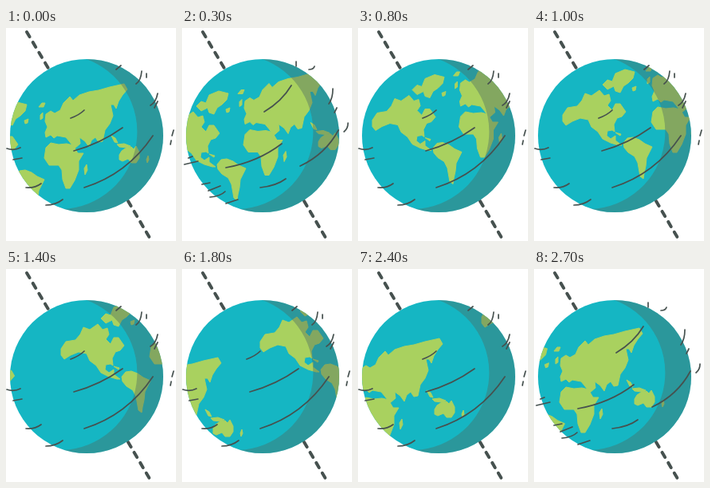
An HTML page that plays this animation: 213x267 px, repeating every 2800 ms.

```html
<!DOCTYPE html>
<html lang="en">
<head>
<meta charset="utf-8">
<title>Spinning globe</title>
<style>
  html, body { margin: 0; height: 100%; overflow: hidden; background: #fff; }
  svg { display: block; width: 100vw; height: 100vh; }
  .land { fill: #a9d15f; stroke: #a9d15f; stroke-width: 1; stroke-linejoin: round; }
  .ink { fill: none; stroke: #46514f; stroke-linecap: round; }
</style>
</head>
<body>
<svg viewBox="0 0 213 267">
  <defs>
    <clipPath id="disc"><circle cx="101" cy="135" r="96"/></clipPath>
    <g id="oldWorld">
      <path d="M50 108L56 104 61 107 68 103 72 94 80 86 84 91 92 84 104 80 116 78 130 74 148 70 152 77 146 84 141 92 138 101 135 96 131 96 134 110 130 120 124 128 121 142 116 143 112 137 107 141 104 149 99 142 92 137 93 145 86 151 80 143 75 137 64 135 60 138 56 134 50 137 49 131 52 124 49 117Z"/>
      <path d="M50 150L56 144 66 146 76 145 84 147 90 157 97 157 91 167 91 178 86 191 80 201 75 201 71 190 70 178 66 172 54 172 48 163Z"/>
      <path d="M98 176L101 171 102 178 99 184ZM41 99L45 94 49 94 47 99ZM43 109L46 106 46 113 43 115Z"/>
      <path d="M132 135L137 138 140 144 136 143ZM139 146L148 145 156 148 151 150 142 149ZM142 159L145 154 151 150 157 149 160 152 163 148 167 156 167 163 163 169 157 169 153 164 146 167 142 165ZM176 165L178 160 179 165 177 169Z"/>
    </g>
    <g id="americas">
      <path d="M0 122L6 113 18 111 24 104 28 95 36 98 46 91 52 98 58 96 60 104 56 110 62 116 66 108 72 108 79 118 74 124 68 126 64 134 65 143 62 141 56 142 55 148 60 152 66 148 66 154 74 160 70 160 60 157 50 152 44 143 36 137 32 128 22 126 12 130 4 135 0 130Z"/>
      <path d="M76 157L81 151 88 150 96 153 103 158 112 162 108 170 105 176 104 186 102 195 101 202 97 199 94 182 90 174 82 169 77 163Z"/>
      <path d="M50 84L56 78 62 80 66 70 78 65 90 68 88 76 82 82 76 86 72 94 66 92 64 86 56 90ZM87 88L92 86 91 91 88 92ZM66 144L73 146 72 148Z"/>
    </g>
  </defs>

  <g class="ink" stroke-width="4" stroke-linecap="butt" stroke-dasharray="7 8">
    <path d="M26 5L54 52"/>
    <path d="M153 217L180 263"/>
  </g>

  <g clip-path="url(#disc)">
    <rect width="213" height="267" fill="#15b6c3"/>
    <g id="map" class="land"></g>
    <path d="M98 38A97 97 0 0 1 70 227L213 267V0H98Z" fill="#4b6b61" fill-opacity=".41"/>
  </g>

  <g class="ink" stroke-width="1.7">
    <path class="wind" d="M81 113Q92 109 98 103M85 154Q118 145 146 125M98 200Q152 183 184 135M1 151Q10 154 18 150M9 165L20 163M25 200Q36 201 44 195M50 222Q62 222 71 215M163 70Q169 66 170 54M176 57V62M138 52L144 47M181 97Q188 93 190 82M186 100L190 92M206 146L207 141M208 135L210 128"/>
    <path class="wind" d="M103 105Q125 92 137 72M55 175Q95 168 125 145M148 173Q180 158 196 128M98 200Q118 198 130 189M3 171L20 167M8 163L13 161M25 196L35 194M33 204L48 198M35 212Q48 211 54 205M55 220L70 215M159 52Q165 52 166 48M143 48V42M184 95Q189 88 189 76M191 106L194 100M203 130Q208 126 208 119"/>
  </g>
</svg>
<script>
const STEP = 100, STEPS = 28;
const map = document.getElementById('map');
const winds = document.querySelectorAll('.wind');

// Each path lists [step, x, y] across one pass over the disc.
const paths = {
  oldWorld: [[-15, -151, 61], [-10, -103, 41], [-4, -46, 17], [-1, -16, 4], [0, 0, 0],
             [6, 58, -33], [10, 99, -45], [14, 132, -53], [20, 185, -75]],
  americas: [[-4, -102, 43], [0, -64, 28], [6, 0, 0], [10, 36, -13], [14, 69, -22],
             [18, 98, -31], [24, 155, -62], [28, 195, -80]]
};

function along(keys, step) {
  const i = keys.findIndex(k => k[0] >= step);
  if (i < 0 || step < keys[0][0]) return null;
  if (i === 0) return keys[0].slice(1);
  const [a, b] = [keys[i - 1], keys[i]];
  const u = (step - a[0]) / (b[0] - a[0]);
  return [1, 2].map(n => a[n] + (b[n] - a[n]) * u);
}

// Two copies of each half of the map, one turn apart.
const copies = Object.entries(paths).flatMap(([id, keys]) => [0, STEPS].map(lag => {
  const el = document.createElementNS('http://www.w3.org/2000/svg', 'use');
  el.setAttribute('href', '#' + id);
  map.append(el);
  return { el, keys, lag };
}));

function draw() {
  const step = Math.floor(performance.now() / STEP) % STEPS;
  for (const { el, keys, lag } of copies) {
    const pos = along(keys, step - lag);
    el.style.display = pos ? '' : 'none';
    if (pos) el.setAttribute('transform', `translate(${pos})`);
  }
  winds.forEach((wind, i) => wind.style.display = step % 2 === i ? '' : 'none');
  requestAnimationFrame(draw);
}
draw();
</script>
</body>
</html>
```
